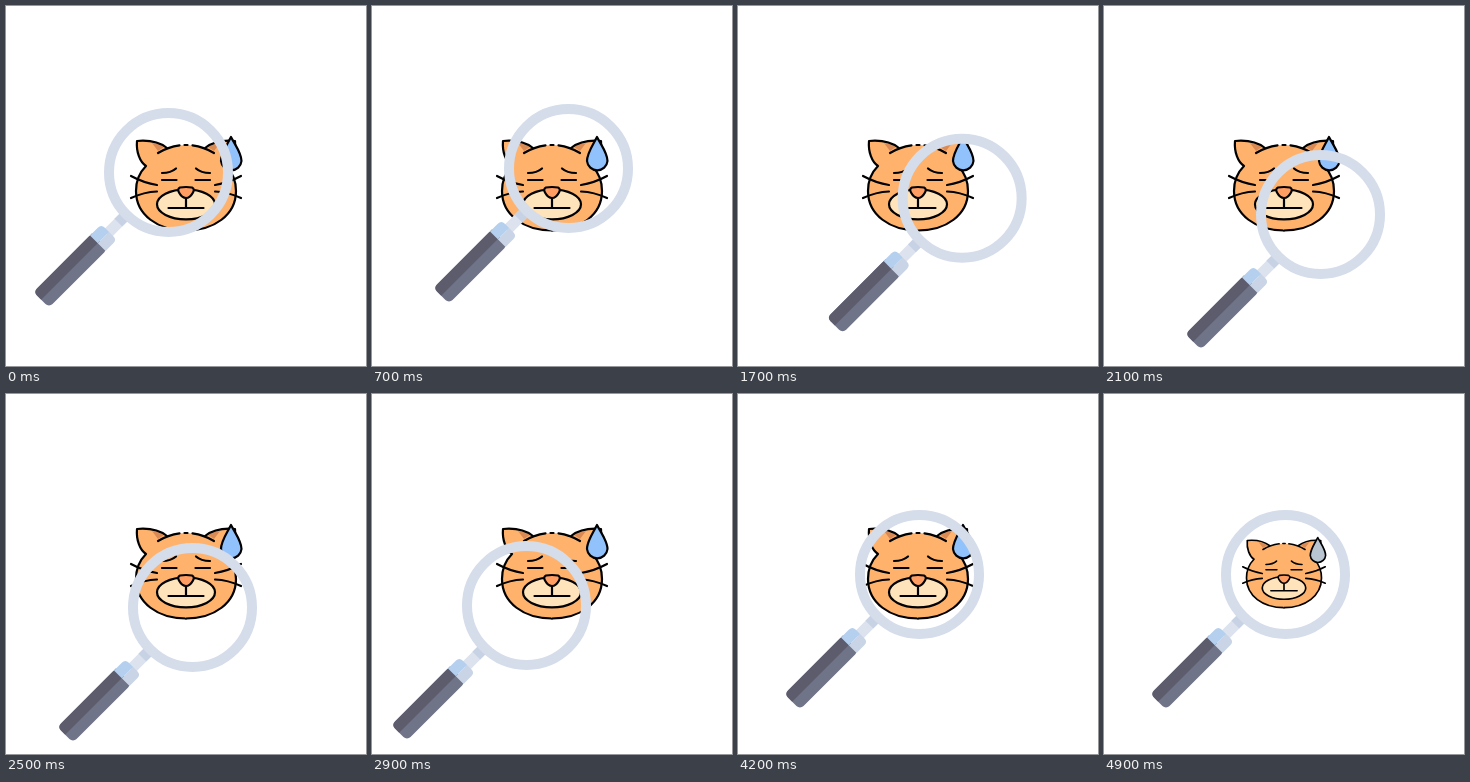
Write an HTML page that moves like this. It is 360 by 360 pixels and loops after 5000 ms.

```html
<!DOCTYPE html>
<html lang="en">
<head>
<meta charset="utf-8">
<title>Cat under a magnifier</title>
<style>
  html, body { margin: 0; height: 100%; overflow: hidden; background: #fff; }
  svg { display: block; width: 100%; height: 100%; }
  .line { fill: none; stroke: #000; stroke-width: 2.2; stroke-linecap: round; stroke-linejoin: round; }
</style>
</head>
<body>
<svg viewBox="0 0 360 360">
  <defs>
    <g id="half">
      <path fill="#feb26c" d="M181 139H180C174 139 168 140 161 142C152 135 142 134 131 135C130 146 134 156 140 160C133 167 130 176 130 185C130 209 152 224.5 180 224.5H181Z"/>
      <path fill="#d98a55" d="M146 137Q153 138 158 141L152 145Z"/>
      <path class="line" d="M161 142C152 135 142 134 131 135C130 146 134 156 140 160C133 167 130 176 130 185C130 209 152 224.5 180 224.5M173.5 139.4Q162 141 152 147"/>
      <path class="line" d="M156 167Q165 167 170 162.500M156 174H170.500M125 170Q138 177 151 179M125 192Q138 186 151 185.500"/>
    </g>
  </defs>
  <g id="cat">
    <use href="#half"/>
    <use href="#half" transform="matrix(-1 0 0 1 360 0)"/>
    <path class="line" d="M178.500 139H181.500"/>
    <ellipse class="line" cx="180" cy="198.300" rx="29" ry="15" style="fill:#ffe3ba"/>
    <path class="line" d="M180 192V202M162.500 202H197.500"/>
    <path class="line" style="fill:#ff9d62" d="M174 181.500Q180 180.500 186 181.500Q189 183 187 186.500Q184 192 180 192Q176 192 173 186.500Q171 183 174 181.500Z"/>
    <path id="drop" class="line" d="M225 131C229 139 235.500 147 235.500 155A10.300 10.300 0 0 1 215 155C215 147 221 139 225 131Z"/>
  </g>
  <g id="glass">
    <g transform="rotate(135)">
      <path fill="#dde3ee" d="M62-5.500H87V5.500H62Z"/>
      <path fill="#c8d2e5" d="M62-5.500H71V5.500H62Z"/>
      <rect x="97" y="-11" width="83" height="22" rx="5" fill="#707488"/>
      <path fill="#5c5c6d" d="M97 0H180V6Q180 11 175 11H97Z"/>
      <path fill="#c9d5e6" d="M100-11H89Q84-11 84-6V0H100Z"/>
      <path fill="#b4d0ee" d="M100 11H89Q84 11 84 6V0H100Z"/>
    </g>
    <circle r="59.500" fill="none" stroke="#d5dcea" stroke-width="10"/>
  </g>
</svg>
<script>
const LOOP = 5000, STEP = 100;
// time, x, y of the lens centre
const path = [
  [100, 162.5, 166.5], [700, 196.5, 162.5], [1300, 222.5, 174.5], [1900, 222.5, 201.5],
  [2100, 216.5, 208.5], [2500, 186.5, 213.5], [2900, 154.5, 211.5], [3100, 145.5, 203.5],
  [3400, 153.5, 185.5], [3700, 165.5, 175.5], [4200, 181.5, 180.5]
];
const [cat, drop, glass] = ['cat', 'drop', 'glass'].map(id => document.getElementById(id));

function slope(i, axis) {
  const a = path[i - 1], b = path[i + 1];
  return a && b ? (b[axis] - a[axis]) / (b[0] - a[0]) : 0;
}

// Cubic Hermite curve through the points
function position(t, axis) {
  const last = path.length - 1;
  if (t <= path[0][0]) return path[0][axis];
  if (t >= path[last][0]) return path[last][axis];
  const i = path.findIndex(p => p[0] > t) - 1;
  const a = path[i], b = path[i + 1], span = b[0] - a[0];
  const u = (t - a[0]) / span, v = 1 - u;
  return v * v * (1 + 2 * u) * a[axis] + u * u * (3 - 2 * u) * b[axis]
    + span * u * v * (v * slope(i, axis) - u * slope(i + 1, axis));
}

function draw(now) {
  const t = Math.floor(now % LOOP / STEP) * STEP;
  const shrink = Math.max(0, (t - 4500) / 400);
  glass.setAttribute('transform', `translate(${position(t, 1)} ${position(t, 2)})`);
  cat.setAttribute('transform', `translate(180 181) scale(${1 - 0.25 * shrink}) translate(-180 -181)`);
  drop.style.fill = shrink ? '#b9c5d0' : '#92c2fc';
}

const start = performance.now();
function tick() {
  draw(performance.now() - start);
  requestAnimationFrame(tick);
}
tick();
</script>
</body>
</html>
```
